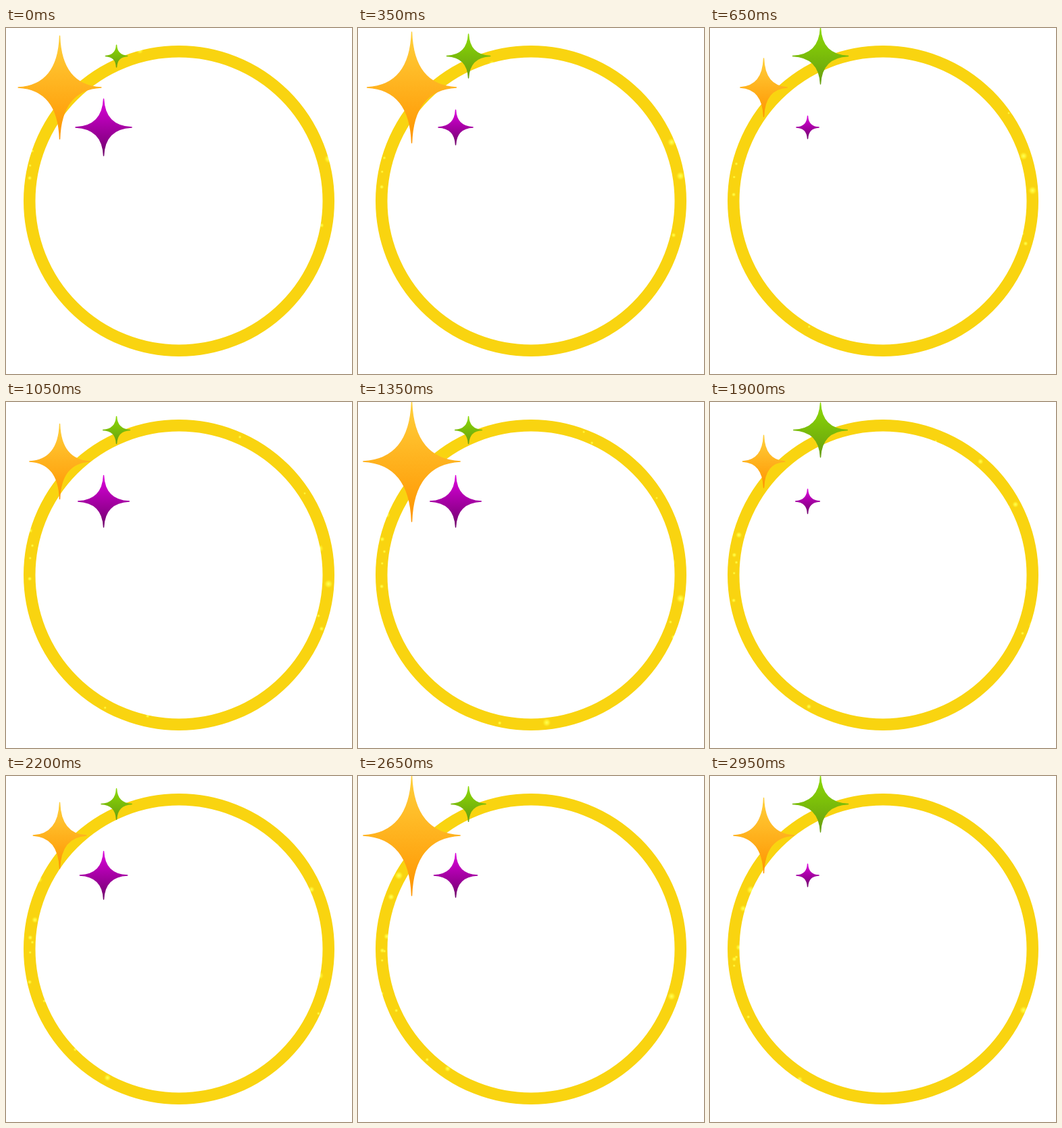
An HTML page with a canvas that plays this animation: 512 by 512 pixels, repeating every 3000 ms.

```html
<!DOCTYPE html>
<html lang="en">
<head>
<meta charset="utf-8">
<title>Sparkling ring</title>
<style>
html, body { margin: 0; width: 100%; height: 100%; overflow: hidden; background: #fff; }
canvas { display: block; }
</style>
</head>
<body>
<canvas id="stage" width="512" height="512"></canvas>
<script>
const ctx = document.getElementById('stage').getContext('2d');
const LOOP = 3000, STEP = 50, PULSE = 1200;
const CENTER = 256, RADIUS = 221.25, TAU = 2 * Math.PI;

let seed = 7;
const random = () => (seed = seed * 16807 % 2147483647) / 2147483647;

// larger glints look nearer and fall faster
const fallSpeed = r => 0.0112 * r;

// a glint that crosses the ring at a random place and time
function randomGlint() {
  const angle = TAU * random(), r = 2 + 5 * random() ** 1.5;
  return {
    x: CENTER + RADIUS * Math.cos(angle),
    y: CENTER + RADIUS * Math.sin(angle) - fallSpeed(r) * LOOP * random(),
    r
  };
}

// three glints run along the steep sides, the rest cross anywhere
const glints = [
  { x: 39, y: 182, r: 2.6 },
  { x: 464, y: 145, r: 6.1 },
  { x: 467, y: 292, r: 3.7 },
  ...Array.from({ length: 24 }, randomGlint)
];

// size is the largest half height, reached at the time peak
const stars = [
  { x: 79.5, y: 88, size: 90, aspect: 0.805, peak: 200, top: '#ffd03c', bottom: '#ff9400' },
  { x: 144.5, y: 147, size: 42, aspect: 0.99, peak: 0, top: '#dc00dc', bottom: '#70006c' },
  { x: 163.5, y: 41.5, size: 42, aspect: 0.99, peak: 600, top: '#8cda04', bottom: '#689e10' }
];

function drawRing() {
  ctx.beginPath();
  ctx.arc(CENTER, CENTER, RADIUS, 0, TAU);
  ctx.lineWidth = 17.5;
  ctx.strokeStyle = '#f9d410';
  ctx.stroke();
}

function drawGlint({ x, y: y0, r }, t) {
  const y = y0 + fallSpeed(r) * t;
  const glow = ctx.createRadialGradient(x, y, 0, x, y, r);
  glow.addColorStop(0, 'rgba(255,255,90,1)');
  glow.addColorStop(0.5, 'rgba(255,245,50,.8)');
  glow.addColorStop(1, 'rgba(255,230,30,0)');
  ctx.fillStyle = glow;
  ctx.fillRect(x - r, y - r, 2 * r, 2 * r);
}

function drawStar({ x, y, size, aspect, peak, top, bottom }, t) {
  const h = size * (0.695 + 0.305 * Math.cos(TAU * (t - peak) / PULSE));
  const w = h * aspect;
  const paint = ctx.createLinearGradient(0, y - h, 0, y + h);
  paint.addColorStop(0, top);
  paint.addColorStop(1, bottom);
  // four tips joined by curves that bend in almost to the middle
  const bend = 0.04;
  ctx.beginPath();
  ctx.moveTo(x, y - h);
  for (let i = 1; i <= 4; i++) {
    const tip = i * TAU / 4, mid = tip - TAU / 8;
    ctx.quadraticCurveTo(
      x + w * bend * Math.SQRT2 * Math.sin(mid), y - h * bend * Math.SQRT2 * Math.cos(mid),
      x + w * Math.sin(tip), y - h * Math.cos(tip));
  }
  ctx.closePath();
  ctx.fillStyle = ctx.strokeStyle = paint;
  ctx.lineWidth = 1.4;
  ctx.lineJoin = 'round';
  ctx.fill();
  ctx.stroke();
}

function draw(now) {
  const t = Math.floor(now % LOOP / STEP) * STEP;
  ctx.clearRect(0, 0, 512, 512);
  drawRing();
  ctx.globalCompositeOperation = 'source-atop'; // glints show only on the ring
  glints.forEach(g => drawGlint(g, t));
  ctx.globalCompositeOperation = 'source-over';
  stars.forEach(s => drawStar(s, t));
}

let begin;
function tick(now) {
  begin ??= now;
  draw(now - begin);
  requestAnimationFrame(tick);
}
draw(0);
requestAnimationFrame(tick);
</script>
</body>
</html>
```
